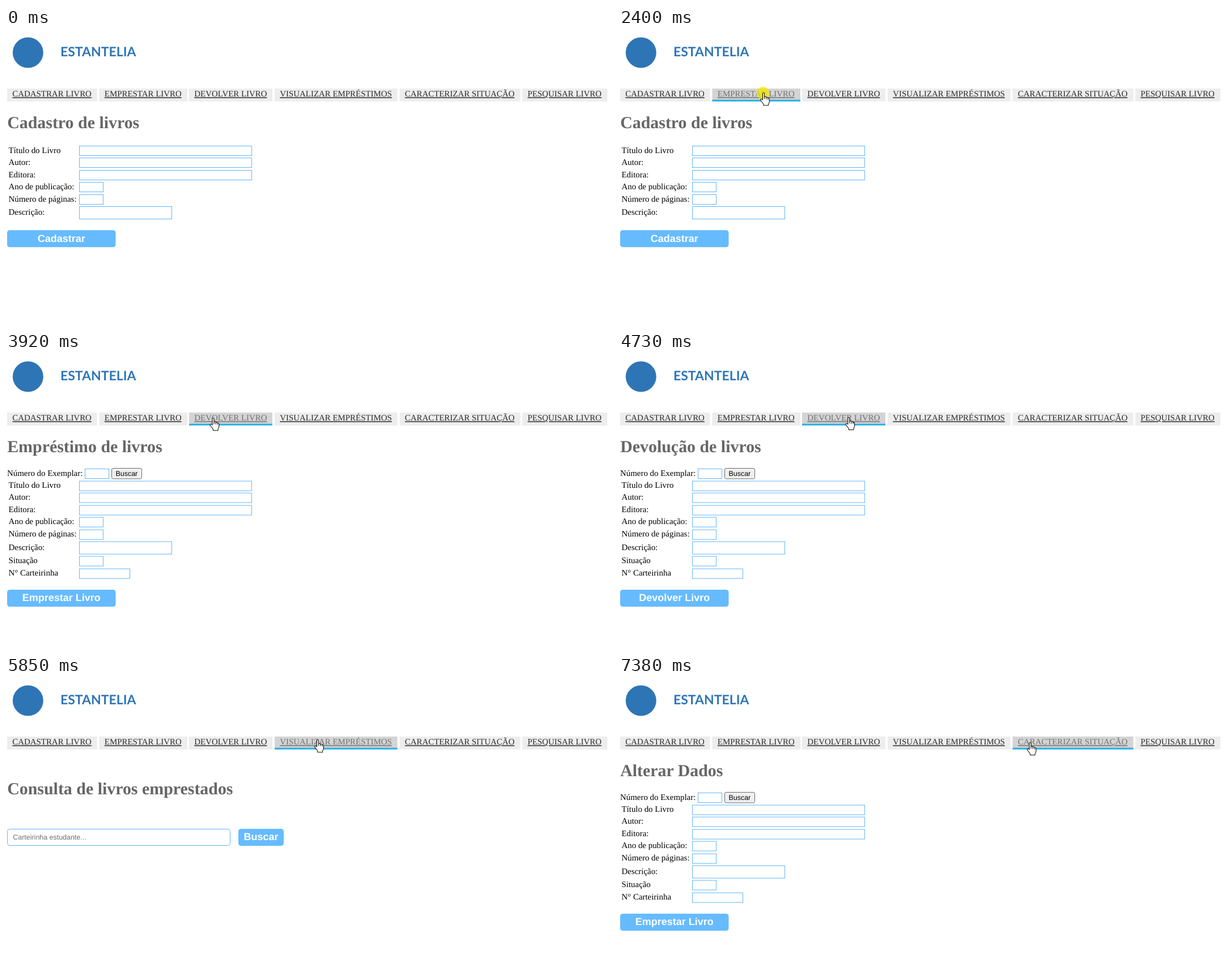
Animation, 1071 px wide and 523 px high, one loop 8000 ms. Source, as an HTML page:

```html
<!DOCTYPE html>
<html lang="pt">
<head>
<meta charset="utf-8">
<title>Cadastro de livros</title>
<style>
  html, body { margin: 0; width: 100%; height: 100%; overflow: hidden; background: #fff; }
  svg { display: block; width: 1071px; height: 523px; text-rendering: geometricPrecision; }
  text { font: 14.92px "Liberation Serif", "Times New Roman", serif; white-space: pre; }
  .brand { font: 700 23px Lato, sans-serif; fill: #2e75b6; }
  .title { font-size: 29.9px; font-weight: 700; fill: #666; }
  .field { fill: #fff; stroke: #62b5fa; }
  .button { fill: #66bbff; }
  .action { font: 700 18px "Liberation Sans", Arial, sans-serif; fill: #fff; text-anchor: middle; }
  .small { font: 12.45px "Liberation Sans", Arial, sans-serif; }
  .hint { fill: #707070; }
  .tab rect { fill: #ededed; }
  .tab text { fill: #2b2b2b; text-decoration: underline; }
  .tab .bar { fill: none; }
  .tab.on rect { fill: #d4d4d4; }
  .tab.on text { fill: #707070; }
  .tab.on .bar { fill: #2bb1e6; }
  .hand { fill: #fff; stroke: #111; stroke-width: 1.1; stroke-linejoin: round; }
  .arrow { fill: #fff; stroke: #555; stroke-width: .9; }
  .click { fill: #f3e600; opacity: .78; }
</style>
</head>
<body>
<svg id="stage" viewBox="0 0 1071 523" xmlns="http://www.w3.org/2000/svg"></svg>
<script>
const LOOP = 8000, STEP = 67;

const tabs = [
  [2, 160.5, 'CADASTRAR LIVRO'], [164.5, 320, 'EMPRESTAR LIVRO'],
  [323, 470, 'DEVOLVER LIVRO'], [474, 690.5, 'VISUALIZAR EMPRÉSTIMOS'],
  [694.5, 907.5, 'CARACTERIZAR SITUAÇÃO'], [911, 1061, 'PESQUISAR LIVRO']
];

// label, top of the field, width, height
const fields = [
  ['Título do Livro', 0, 305, 18], ['Autor:', 21, 305, 18], ['Editora:', 43, 305, 18],
  ['Ano de publicação:', 64, 43, 18], ['Número de páginas:', 86, 43, 18],
  ['Descrição:', 107, 164, 23], ['Situação', 133, 43, 18], ['N° Carteirinha', 155, 90, 18]
];

const loads = [0, 2740, 4120, 5320, 6520, 6660];
const clicks = [[2400, 2470], [3850, 3920], [5120, 5190], [6330, 6380]];
const busy = [6380, 6520];
const enter = { at: 190, x: 953, y: 476 };

// start, number of steps, end point
const moves = [
  [260, 3, 514, 288], [590, 7, 254, 115],
  [3400, 3, 335, 119], [3590, 1, 364.5, 117],
  [4660, 7, 518, 112],
  [5850, 1, 549, 113], [5910, 5, 728.5, 114],
  [7380, 1, 724.5, 118]
];

const text = (x, y, s, cls = '') => `<text x="${x}" y="${y}" class="${cls}">${s}</text>`;
const box = (x, y, w, h, r = 0) =>
  `<rect class="field" x="${x + .5}" y="${y + .5}" width="${w - 1}" height="${h - 1}" rx="${r}"/>`;
const button = (x, y, w, label) =>
  `<rect class="button" x="${x}" y="${y}" width="${w}" height="30" rx="4.5"/>` +
  text(x + w / 2, y + 20.3, label, 'action');
const title = (s, y = 177.3) => text(2.2, y, s, 'title');

const rows = (top, count) => fields.slice(0, count).map(([label, dy, w, h]) =>
  text(4.5, top + dy + h / 2 + 3.7, label) + box(129, top + dy, w, h)).join('');

const tab = ([x, end, label]) => `<g class="tab">
  <rect x="${x}" y="107" width="${end - x}" height="22.7"/>
  <path class="bar" d="M${x} 126.8H${end}V129.7H${x}Z"/>${text(x + 9.3, 121.4, label)}</g>`;

const loanForm = (heading, action) => title(heading) +
  text(2, 219, 'Número do Exemplar:') + box(139, 206, 43, 18) +
  '<rect x="186.5" y="205.5" width="53" height="18.5" rx="2.5" fill="#efefef" stroke="#6b6b6b"/>' +
  text(193.5, 219, 'Buscar', 'small') + rows(227.6, 8) + button(2, 420, 191.5, action);

const pages = [
  title('Cadastro de livros') + rows(208, 6) + button(2, 357.3, 191.5, 'Cadastrar'),
  loanForm('Empréstimo de livros', 'Emprestar Livro'),
  loanForm('Devolução de livros', 'Devolver Livro'),
  title('Consulta de livros emprestados', 209.3) + box(2, 270, 394, 30, 4) +
    text(12.3, 289, 'Carteirinha estudante...', 'small hint') + button(410, 270, 80, 'Buscar'),
  '',
  loanForm('Alterar Dados', 'Emprestar Livro')
];

const stage = document.getElementById('stage');
stage.innerHTML = `
  <g id="header">
    <circle cx="38.8" cy="43.5" r="27" fill="#2e75b6"/>
    ${text(96, 49.6, 'ESTANTELIA', 'brand')}${tabs.map(tab).join('')}
  </g>
  ${pages.map(p => `<g class="page">${p}</g>`).join('')}
  <g id="cursor">
    <circle class="click" r="11"/>
    <path class="arrow" d="M.5 .6V16.4L4.1 13L6.5 18.4L8.8 17.4L6.5 12.1H11.2Z"/>
    <path class="hand" transform="translate(1)" d="M-1.5 12V1.2Q-1.5-.5 0-.5T1.5 1.2V6.5Q4.4 5.6 4.7 7.5
      Q7.4 6.8 7.8 8.5Q10.3 8.2 10.3 10.5V15Q10.3 17 8.5 19.5V21.8H0V19.5L-4.8 13Q-6 11-4.3 10.5
      Q-3 10.3-1.5 12ZM1.5 6.5V10.5M4.7 7.5V11M7.8 8.5V11.5"/>
  </g>`;

const $ = s => stage.querySelector(s);
const header = $('#header'), cursor = $('#cursor');
const arrow = $('.arrow'), hand = $('.hand'), ring = $('.click');
const pageNodes = stage.querySelectorAll('.page'), tabNodes = stage.querySelectorAll('.tab');

const show = (node, on) => { node.style.display = on ? '' : 'none'; };
const within = (t, [from, to]) => t >= from && t < to;
const ease = p => .7 * p + .3 * p * p * (3 - 2 * p);

function pointer(t) {
  let { x, y, at } = enter;
  for (const [start, n, tx, ty] of moves) {
    if (t < start) break;
    const p = ease(Math.min(n, Math.floor((t - start) / STEP) + 1) / n);
    x += (tx - x) * p;
    y += (ty - y) * p;
    at = start;
  }
  return { x, y, at };
}

function draw(t) {
  const page = loads.filter(at => at <= t).length - 1;
  const { x, y, at } = pointer(t);
  // A freshly loaded page ignores the pointer until it moves again.
  const live = t >= enter.at && at >= loads[page] && y >= 107 && y < 130;
  const over = live ? tabs.findIndex(([from, to]) => x >= from && x < to) : -1;
  const pointing = over >= 0 && !within(t, busy);

  show(header, pages[page]);
  pageNodes.forEach((node, i) => show(node, i === page));
  tabNodes.forEach((node, i) => node.classList.toggle('on', i === over));
  show(cursor, t >= enter.at);
  cursor.setAttribute('transform', `translate(${x} ${y})`);
  show(hand, pointing);
  show(arrow, !pointing);
  show(ring, clicks.some(c => within(t, c)));
}

const origin = performance.now();
function tick() {
  draw((performance.now() - origin) % LOOP);
  requestAnimationFrame(tick);
}
tick();
</script>
</body>
</html>
```
